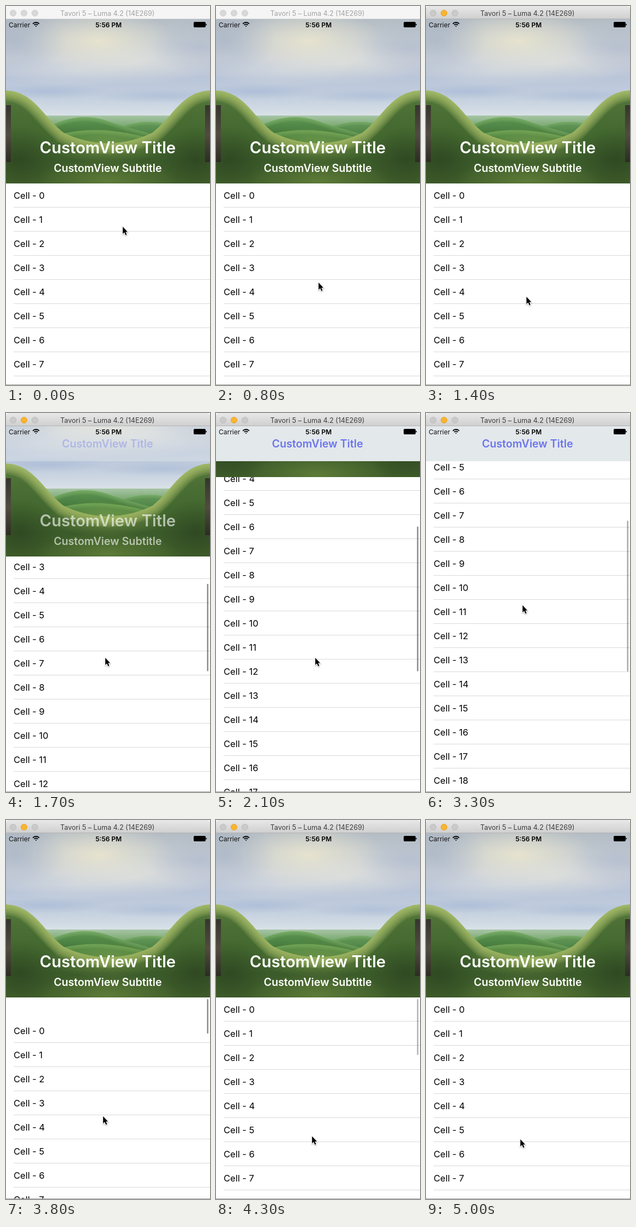
Recreate the animation shown at these times as an HTML page with a canvas. Size 374 px wide and 692 px high, loop 5100 ms.

```html
<!DOCTYPE html>
<html lang="en">
<head>
<meta charset="utf-8">
<title>Collapsing header</title>
<style>
  html, body { margin: 0; width: 374px; height: 692px; overflow: hidden; background: #fff; }
  canvas { display: block; }
</style>
</head>
<body>
<canvas id="stage" width="374" height="692"></canvas>
<script>
const W = 374, H = 692, LOOP = 5100, STEP = 100;
const SCREEN_TOP = 24, HEADER_H = 300, NAV_H = 64, ROW_H = 44, ROWS = 30;
const COLLAPSE = HEADER_H - NAV_H;
const ctx = document.getElementById('stage').getContext('2d');

// Each key is [time, value, ...].
const pointerKeys = [[0, 213, 402], [600, 192, 488], [800, 187, 504], [1200, 184, 530], [1450, 183, 530],
  [1650, 181, 446], [2600, 181, 446], [3200, 176, 350], [3500, 176, 350], [3650, 176, 400],
  [3800, 177, 540], [4100, 176, 575], [5000, 172, 582]];
const headerKeys = [[1450, 0], [1600, -25], [1700, -62], [1800, -118], [1900, -162], [2000, -192],
  [2200, -222], [2500, -235], [2600, -236], [3600, -236], [3700, -115], [3800, 0]];
const listKeys = [[1450, 0], [1600, -95], [1700, -197]];
const returnKeys = [[3600, -468], [3700, -200], [3800, 39], [3900, 36], [4000, 20], [4100, 9], [4200, 3], [4300, 0]];
const barKeys = [[1450, 0], [1600, 1], [3100, 1], [3300, .75], [3500, 0], [3600, 0], [3700, 1], [4200, 1], [4500, 0]];

function track(keys, t, i = 1) {
  const next = keys.findIndex(k => k[0] > t);
  if (next === 0) return keys[0][i];
  if (next < 0) return keys[keys.length - 1][i];
  const a = keys[next - 1], b = keys[next];
  return a[i] + (b[i] - a[i]) * (t - a[0]) / (b[0] - a[0]);
}

function listShift(t) {
  if (t <= 1700) return track(listKeys, t);
  if (t < 3600) return Math.round(-468 + 271 * Math.exp((1700 - t) / 283));
  return track(returnKeys, t);
}

function gradient(c, y0, y1, ...colors) {
  const g = c.createLinearGradient(0, y0, 0, y1);
  colors.forEach((color, i) => g.addColorStop(i / (colors.length - 1), color));
  return g;
}

function text(str, x, y, font, color, align = 'left') {
  ctx.font = font + ' Inter, sans-serif';
  ctx.fillStyle = color;
  ctx.textAlign = align;
  ctx.fillText(str, x, y);
}

function rect(x, y, w, h, color) {
  ctx.fillStyle = color;
  ctx.fillRect(x, y, w, h);
}

function pill(x, y, w, h, r, color) {
  ctx.fillStyle = color;
  ctx.beginPath();
  ctx.roundRect(x, y, w, h, r);
  ctx.fill();
}

// Soft landscape, painted once.
function paintScenery() {
  const canvas = document.createElement('canvas');
  canvas.width = W;
  canvas.height = HEADER_H;
  const c = canvas.getContext('2d');
  const glow = (x, y, rx, ry, rgb, alpha) => {
    c.save();
    c.translate(x, y);
    c.scale(rx, ry);
    const g = c.createRadialGradient(0, 0, 0, 0, 0, 1);
    g.addColorStop(0, `rgba(${rgb},${alpha})`);
    g.addColorStop(1, `rgba(${rgb},0)`);
    c.fillStyle = g;
    c.fillRect(-1, -1, 2, 2);
    c.restore();
  };
  const hill = (path, fill, rim, reach) => {
    const p = new Path2D(path);
    c.save();
    c.clip(p);
    c.fillStyle = fill;
    c.fill(p);
    c.strokeStyle = rim;
    for (let w = 4; w <= reach; w += 4) {
      c.lineWidth = w;
      c.stroke(p);
    }
    c.restore();
  };

  c.fillStyle = gradient(c, 0, 178, '#b3bcc4', '#c4cbd1', '#cbd1da', '#b9c5d9', '#c3cfde', '#dae2e8');
  c.fillRect(0, 0, W, HEADER_H);
  glow(170, 40, 140, 60, '238,232,205', .8);
  glow(235, 80, 150, 40, '226,227,220', .65);
  glow(120, 95, 130, 30, '222,225,224', .5);
  glow(15, 40, 95, 60, '156,170,192', .5);
  glow(355, 50, 95, 50, '164,176,200', .45);
  glow(75, 132, 120, 14, '160,178,212', .5);
  glow(290, 140, 130, 14, '160,178,212', .45);

  c.fillStyle = gradient(c, 175, 245, '#a9c6a8', '#74a56a', '#4a8345', '#437a3c');
  c.fillRect(0, 176, W, 124);
  hill('M190 205 Q260 172 320 200 V250 H190 Z', gradient(c, 184, 225, '#6a9d5e', '#3d7538'), 'rgba(150,192,120,.12)', 12);
  hill('M50 215 C100 175 150 172 190 187 S260 205 310 225 V250 H50 Z', gradient(c, 180, 225, '#5f9653', '#35692f'), 'rgba(150,192,120,.12)', 16);
  hill('M60 225 Q150 180 290 225 V250 H60 Z', gradient(c, 200, 235, '#5a914a', '#3b7033'), 'rgba(150,190,105,.10)', 16);
  hill('M-40 130 H0 C52 133 66 176 105 207 Q140 225 187 227 Q234 225 269 207 C308 176 322 133 374 130 H414 V340 H-40 Z',
    gradient(c, 129, 300, '#587a3d', '#4a6e34', '#43682f', '#3b5b2a', '#415f2b'), 'rgba(186,206,122,.11)', 40);
  glow(187, 230, 110, 34, '150,176,88', .5);
  glow(187, 295, 130, 40, '104,134,60', .7);
  glow(25, 255, 70, 60, '36,54,26', .5);
  glow(349, 255, 70, 60, '36,54,26', .5);
  c.fillStyle = gradient(c, 155, 265, '#35352c', '#514b40', '#292a20');
  c.fillRect(0, 157, 9, 104);
  c.fillRect(365, 157, 9, 104);
  return canvas;
}
const scenery = paintScenery();

function drawRows(shift) {
  for (let i = 0; i < ROWS; i++) {
    const y = SCREEN_TOP + HEADER_H + i * ROW_H + shift;
    if (y < 0 || y > H) continue;
    text('Cell - ' + i, 14, y + 28, '400 16.5px', '#000');
    rect(14, Math.round(y) + 43, W - 14, 1, '#d9d9db');
  }
}

function drawHeader(shift, p) {
  ctx.save();
  ctx.beginPath();
  ctx.rect(0, SCREEN_TOP, W, H);
  ctx.clip();
  ctx.drawImage(scenery, 0, SCREEN_TOP + shift);
  const white = `rgba(255,255,255,${Math.max(0, 1 - p * 1.5)})`;
  text('CustomView Title', 186.5, 268.5 + shift, '600 29.4px', white, 'center');
  text('CustomView Subtitle', 186.5, 303 + shift, '600 19.7px', white, 'center');
  ctx.globalAlpha = Math.min(1, p * 1.4);
  rect(0, SCREEN_TOP, W, NAV_H, '#e3e8eb');
  text('CustomView Title', 186, 63, '600 19.7px', '#6b75ec', 'center');
  ctx.restore();
}

function drawStatus() {
  text('Carrier', 5, 39, '400 12px', '#111');
  text('5:56 PM', W / 2 + 1, 38.5, '600 12px', '#000', 'center');
  ctx.strokeStyle = '#000';
  ctx.lineWidth = 1.8;
  for (const r of [1, 4.6, 8]) {
    ctx.beginPath();
    ctx.arc(55, 38, r, -Math.PI * .76, -Math.PI * .24);
    ctx.stroke();
  }
  pill(344, 29, 22, 10, 2, '#000');
  pill(366.5, 32.5, 1.5, 3, .7, '#000');
}

function drawTitleBar(active) {
  rect(0, 0, W, 24, '#fff');
  pill(0, 0, W, 24, [5, 5, 0, 0], active ? gradient(ctx, 0, 23, '#e9e8e9', '#d1d0d1') : '#f5f5f5');
  rect(0, 23, W, 1, active ? '#b5b4b5' : '#d8d8d8');
  [13, 33, 53].forEach((x, i) => {
    const lit = active && i === 1;
    ctx.beginPath();
    ctx.arc(x, 13, 5.6, 0, Math.PI * 2);
    ctx.fillStyle = lit ? '#fab42c' : active ? '#cbcacb' : '#d8d8d8';
    ctx.fill();
    ctx.strokeStyle = lit ? '#dea033' : active ? '#b9b8b9' : '#c9c9c9';
    ctx.lineWidth = .8;
    ctx.stroke();
  });
  text('Tavori 5 – Luma 4.2 (14E269)', 186, 18, '400 12.6px', active ? '#3d3d3d' : '#a3a3a3', 'center');
}

function drawScrollBar(header, list, p, alpha) {
  const top = SCREEN_TOP + HEADER_H + header;
  const height = H - 1 - top + 155 * p * (1 - p);
  const offset = header - list;
  const ratio = height / (ROWS * ROW_H);
  const y = top + 3 + Math.max(0, offset) * ratio;
  pill(368.5, y, 2.5, height * ratio - Math.max(0, -offset), 1.2, `rgba(0,0,0,${.45 * alpha})`);
}

function drawPointer(x, y) {
  ctx.save();
  ctx.translate(x, y);
  ctx.shadowColor = 'rgba(0,0,0,.35)';
  ctx.shadowBlur = 2;
  ctx.shadowOffsetY = 1;
  const arrow = new Path2D('M1 1 V14 L4 11.3 L6.2 16.3 L8.4 15.4 L6.2 10.5 H10 Z');
  ctx.strokeStyle = '#fff';
  ctx.lineWidth = 2;
  ctx.stroke(arrow);
  ctx.shadowColor = 'transparent';
  ctx.fillStyle = '#000';
  ctx.fill(arrow);
  ctx.restore();
}

function draw(t) {
  const header = track(headerKeys, t), list = listShift(t), p = -header / COLLAPSE;
  rect(0, 0, W, H, '#fff');
  drawRows(list);
  drawHeader(header, p);
  drawStatus();
  drawScrollBar(header, list, p, track(barKeys, t));
  drawTitleBar(t >= 1000);
  rect(0, H - 1, W, 1, '#a0a0a0');
  drawPointer(track(pointerKeys, t, 1), track(pointerKeys, t, 2));
}

const start = performance.now();
function frame() {
  const t = (performance.now() - start) % LOOP;
  draw(Math.floor(t / STEP) * STEP);
  requestAnimationFrame(frame);
}
frame();
</script>
</body>
</html>
```
